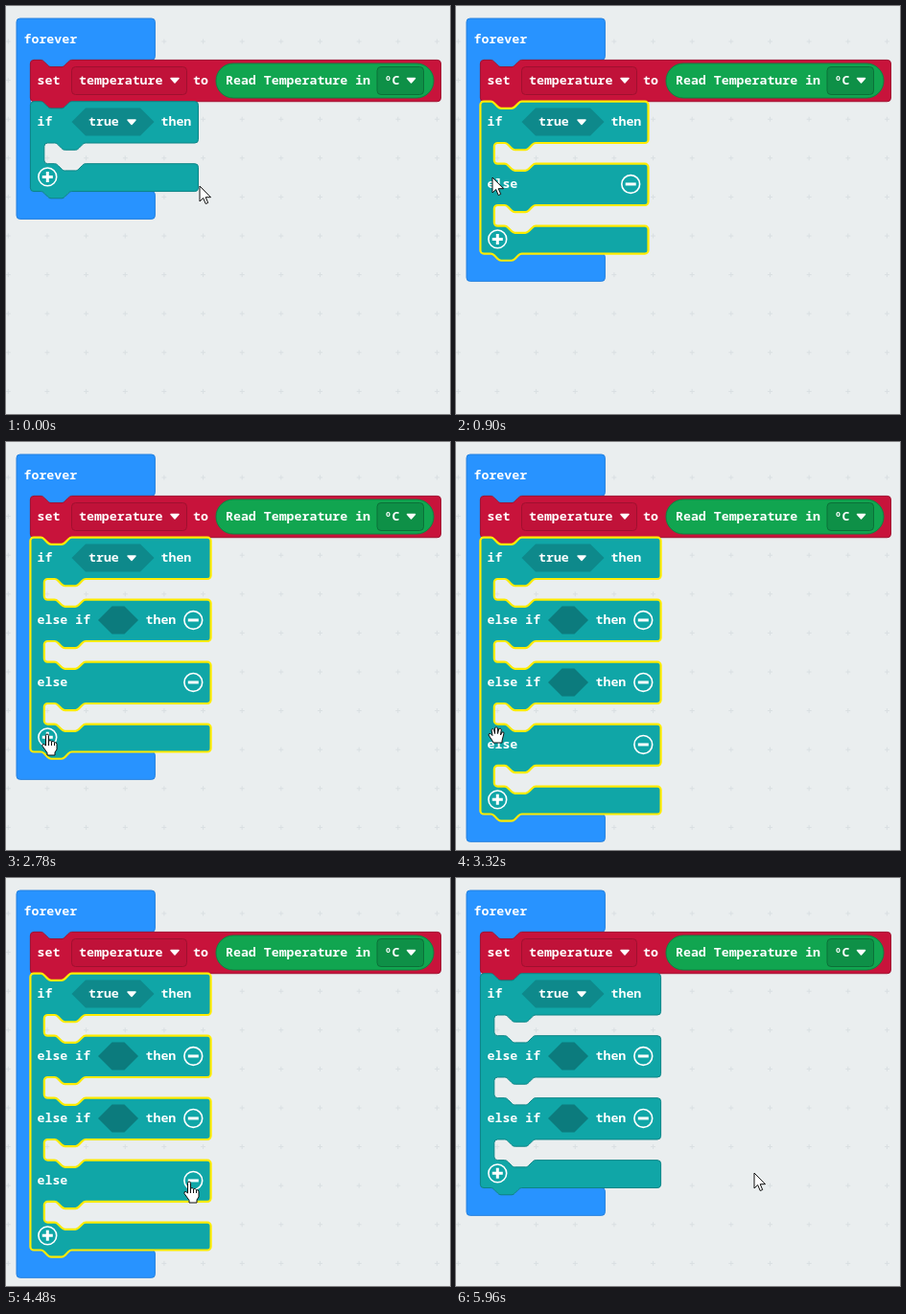
Animation of 463x426 px, one loop 6660 ms. Source, as an HTML page with a canvas:

```html
<!DOCTYPE html>
<html lang="en">
<head>
<meta charset="utf-8">
<title>Building an if / else block</title>
<style>
  html, body { margin: 0; height: 100%; overflow: hidden; background: #eaeeef; }
  canvas { display: block; }
</style>
</head>
<body>
<canvas id="stage" width="463" height="426"></canvas>
<script>
const ctx = document.getElementById('stage').getContext('2d');
const LOOP = 6660, UNIT = 0.9025, PITCH = 72 * UNIT;

// Block outlines, in block units
const NOTCH_RIGHT = 'c2 0 3 1 4 2l4 4c1 1 2 2 4 2h12c2 0 3-1 4-2l4-4c1-1 2-2 4-2';
const NOTCH_LEFT = 'c-2 0-3 1-4 2l-4 4c-1 1-2 2-4 2h-12c-2 0-3-1-4-2l-4-4c-1-1-2-2-4-2';

function block(x, y, width, slots, footer, notched, fill, stroke, line = 1) {
  let d = 'M0 4a4 4 0 0 1 4-4' + (notched ? 'h8' + NOTCH_RIGHT : '');
  const corner = `H${width - 4}a4 4 0 0 1 4 4`;
  d += corner;
  for (const slot of slots)
    d += `v40a4 4 0 0 1-4 4H64${NOTCH_LEFT}h-8a4 4 0 0 0-4 4v${slot - 8}a4 4 0 0 0 4 4h8${NOTCH_RIGHT}${corner}`;
  d += `v${footer - 8}a4 4 0 0 1-4 4` + (notched ? 'H48' + NOTCH_LEFT : '') + 'H4a4 4 0 0 1-4-4z';
  ctx.save();
  ctx.translate(x, y);
  ctx.scale(UNIT, UNIT);
  paint(new Path2D(d), fill, stroke, line / UNIT);
  ctx.restore();
}

function paint(path, fill, stroke, line = 1) {
  if (fill) { ctx.fillStyle = fill; ctx.fill(path); }
  if (stroke) { ctx.strokeStyle = stroke; ctx.lineWidth = line; ctx.stroke(path); }
}

function text(s, x, y) {
  ctx.fillStyle = '#fff';
  ctx.fillText(s, x, y);
}

function pill(x, y, w, h, r, fill, stroke) {
  const p = new Path2D();
  p.roundRect(x, y, w, h, r);
  paint(p, fill, stroke);
}

function hexagon(x, y, w, fill) {
  paint(new Path2D(`M${x} ${y}l14.5-14.5h${w - 29}l14.5 14.5l-14.5 14.5h${29 - w}z`), fill);
}

function triangle(x, y) {
  paint(new Path2D(`M${x - 4} ${y - 2}h8l-4 4.5z`), '#fff', '#fff', 1.5);
}

function button(x, y, plus) {
  const ring = new Path2D();
  ring.arc(x, y, 9.4, 0, 7);
  paint(ring, null, '#fff', 1.6);
  paint(new Path2D(`M${x - 5.5} ${y}h11` + (plus ? `M${x} ${y - 5.5}v11` : '')), null, '#fff', 3);
}

function background() {
  ctx.fillStyle = '#eaeeef';
  ctx.fillRect(0, 0, 463, 426);
  let d = '';
  for (let x = 2.3; x < 463; x += 40.65)
    for (let y = 37; y < 426; y += 40.6) d += `M${x - 2.5} ${y}h5M${x} ${y - 2.5}v5`;
  paint(new Path2D(d), null, '#d9dfe2');
}

// [start, rows after "if"]
const STAGES = [
  [0, []],
  [900, ['else']],
  [2070, ['else if', 'else']],
  [3320, ['else if', 'else if', 'else']],
  [4940, ['else if', 'else if']],
];

function blocks(t) {
  const rows = STAGES.findLast(s => t >= s[0])[1];
  const selected = t >= 900 && t < 5960;
  const slots = Array(rows.length + 1).fill(24);
  const right = rows.length > 1 ? 213.6 : 200.5;

  block(11, 13, 160, [48 + 72 * slots.length + 32], 32, false, '#2893ff', '#2480de');
  text('forever', 18.5, 39);

  block(25.4, 56.4, 474.3, [], 48, true, '#c8133b', '#a0102f');
  text('set', 32.5, 82);
  pill(68.5, 63.5, 120, 29, 4, 'rgba(0,0,0,.04)', '#a0102f');
  text('temperature', 76, 82);
  triangle(176, 77.5);
  text('to', 195, 82);
  pill(219, 60, 227, 36, 18, '#11a550', '#0d8440');
  text('Read Temperature in', 229, 82);
  pill(387, 63.5, 48.5, 29, 4, '#0e9047', '#0b7038');
  text('ºC', 394.5, 82);
  triangle(422.5, 77.5);

  block(25.4, 99.7, (right - 25.4) / UNIT, slots, 32, true, '#10a6a7',
    selected ? '#ffec00' : '#0c8586', selected ? 2.2 : 1);
  text('if', 32.5, 125);
  hexagon(68.5, 121, 86, '#0e898b');
  text('true', 86, 125);
  triangle(131, 121);
  text('then', 161.5, 125);
  rows.forEach((label, i) => {
    const y = 121 + PITCH * (i + 1);
    text(label, 32.5, y + 4);
    if (label === 'else if') {
      hexagon(96, y, 42, '#0c7b7d');
      text('then', 145.5, y + 4);
    }
    button(right - 18.3, y, false);
  });
  button(43.3, 178.4 + PITCH * rows.length, true);
}

// [first step, last step, steps, end point, optional bend]
const MOVES = [
  [70, 690, 9, [38, 179], [130, 204]],
  [1240, 1620, 6, [45, 240]],
  [2320, 2780, 7, [43, 305]],
  [3010, 3010, 1, [43, 307]],
  [3560, 4010, 7, [166, 346], [100, 372]],
  [4085, 4160, 2, [165, 329]],
  [4250, 4480, 4, [191, 317]],
  [5110, 5430, 5, [310, 309]],
  [5660, 5660, 1, [311, 308]],
];

function pointer(t) {
  let from = [202, 188];
  for (const [start, end, steps, to, bend] of MOVES) {
    if (t < start) break;
    const step = steps > 1 ? Math.floor((t - start) / (end - start) * (steps - 1) + 1e-6) : 0;
    const k = Math.min(1, (step + 1) / steps);
    const origin = from;
    from = to.map((b, i) => {
      const a = origin[i], c = bend ? bend[i] : (a + b) / 2;
      return a * (1 - k) ** 2 + 2 * c * k * (1 - k) + b * k * k;
    });
  }
  return from;
}

const SHAPES = {
  arrow: 'M0 0V16l3.7-3.5L6.2 18.5l2.5-1L6.2 11.7H11.5z',
  hand: 'M-1.5 12V1.5a1.5 1.5 0 0 1 3 0V7q2-1 3 .7q2-.7 3 .9q2.5-.3 2.5 2V16l-2 3v3h-8v-2.5l-5-7q-.5-2.5 1.5-2zM1.5 7v5M4.5 8v4M7.5 9v3',
  grab: 'M-5 5l-4-6q0-2 2-1.5l2 2l-1-6q1-2 2.5 0l1 4v-6q1.5-1.5 3 0v6l1.2-5q1.7-1 2.6.5l-.8 6l1.5-3q2-.7 2 1l-2 8v2h-9z',
};
const CURSORS = [
  [0, 'arrow'], [610, 'hand'], [900, 'arrow'], [1240, 'grab'], [1540, 'hand'],
  [2150, 'grab'], [2700, 'hand'], [3320, 'grab'], [3780, 'arrow'],
  [4400, 'hand'], [4940, 'grab'], [5190, 'arrow'],
];
const CLICKS = [[770, 840], [1920, 2000], [3240, 3320], [4710, 4800], [5900, 5960]];

function cursor(t) {
  const [x, y] = pointer(t);
  ctx.save();
  ctx.translate(x, y);
  if (CLICKS.some(([on, off]) => t >= on && t < off)) {
    const halo = new Path2D();
    halo.arc(0, 1, 12, 0, 7);
    paint(halo, 'rgba(225,230,0,.5)');
  }
  paint(new Path2D(SHAPES[CURSORS.findLast(c => t >= c[0])[1]]), '#fff', '#111');
  ctx.restore();
}

function draw(now) {
  const t = now % LOOP;
  ctx.font = 'bold 13.25px "Noto Sans Mono", monospace';
  ctx.lineJoin = 'round';
  background();
  blocks(t);
  cursor(t);
}

const began = performance.now();
function tick() {
  draw(performance.now() - began);
  requestAnimationFrame(tick);
}
tick();
</script>
</body>
</html>
```
